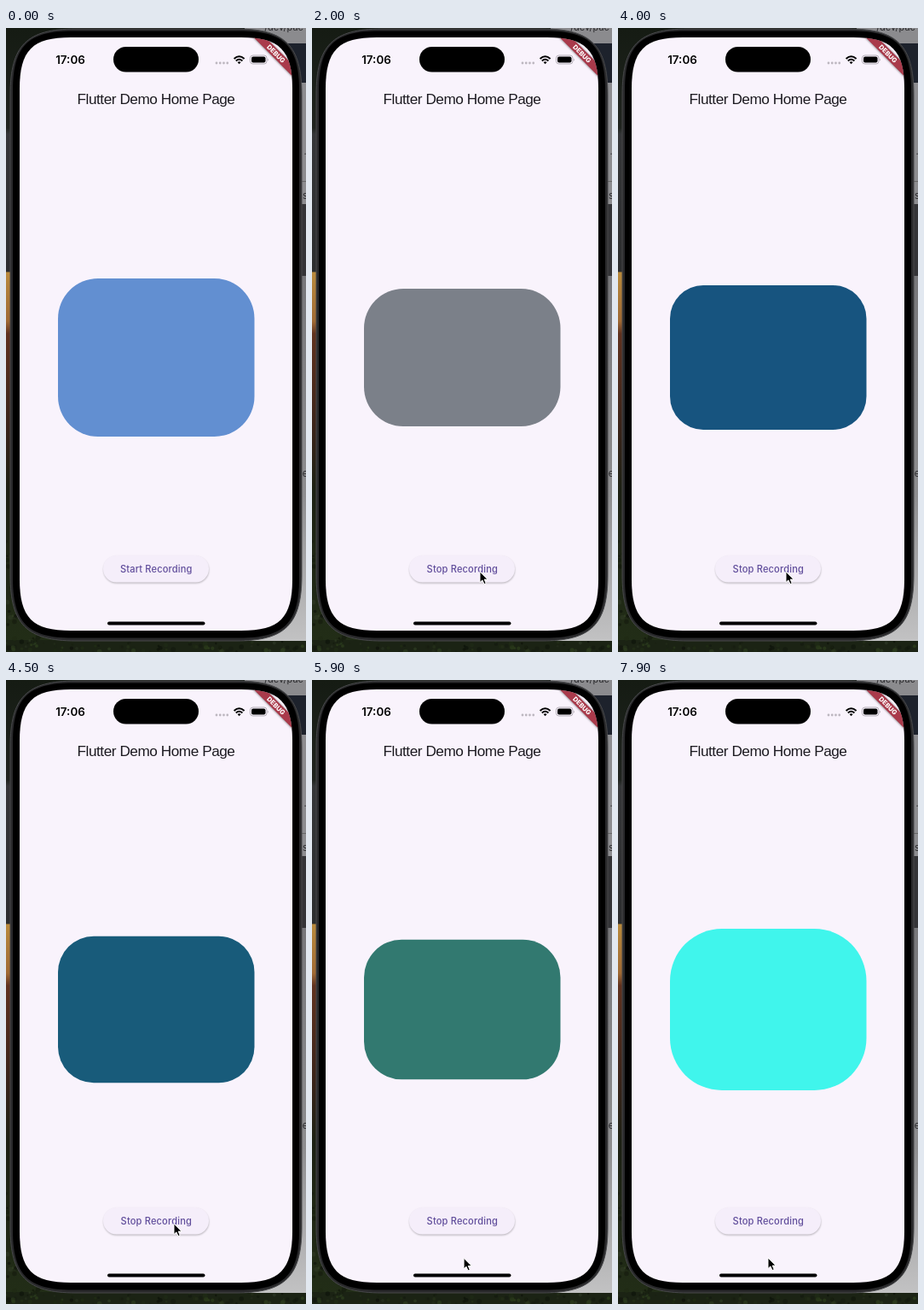
An HTML page that plays this animation: 352x730 px, repeating every 8 s.

```html
<!DOCTYPE html>
<html lang="en">
<head>
<meta charset="utf-8">
<title>Shape morph demo</title>
<style>
  html, body { margin: 0; width: 100%; height: 100%; overflow: hidden; background: #171a14; }
  svg { display: block; width: 352px; height: 730px; }
  text { text-anchor: middle; }
  .ui { font-family: Inter, "Open Sans", sans-serif; }
  .title { font: 17.2px "Liberation Sans", Arial, sans-serif; letter-spacing: -.45px; fill: #1c1a20; }
  .label { font-size: 11.1px; font-weight: 500; letter-spacing: .15px; fill: #604d9b; }
  .clock { font-size: 13.4px; font-weight: 600; }
  .scrap { font-size: 11px; fill: #29292c; }
</style>
</head>
<body>
<svg viewBox="0 0 352 730">
  <defs>
    <linearGradient id="photo" x2="0" y2="1">
      <stop offset="0" stop-color="#151b13"/>
      <stop offset=".16" stop-color="#20241f"/>
      <stop offset=".17" stop-color="#353638"/>
      <stop offset=".39" stop-color="#2c2d2e"/>
      <stop offset=".392" stop-color="#b98a3c"/>
      <stop offset=".47" stop-color="#a06a34"/>
      <stop offset=".49" stop-color="#60321f"/>
      <stop offset=".64" stop-color="#3a241a"/>
      <stop offset=".74" stop-color="#1c2013"/>
      <stop offset="1" stop-color="#222e17"/>
    </linearGradient>
    <linearGradient id="pane" x2="0" y2="1">
      <stop offset="0" stop-color="#77777a"/>
      <stop offset=".6" stop-color="#8e8e90"/>
      <stop offset="1" stop-color="#c2c2c3"/>
    </linearGradient>
    <clipPath id="clip"><path id="mask"/></clipPath>
    <filter id="soft" x="-10%" y="-60%" width="120%" height="220%"><feGaussianBlur stdDeviation="1.1"/></filter>
  </defs>

  <!-- desktop behind the phone -->
  <rect width="352" height="730" fill="url(#photo)"/>
  <rect y="716" width="352" height="14" fill="#1b2314"/>
  <g id="leaves"></g>
  <rect x="280" width="72" height="18" fill="#8b8b8e"/>
  <rect x="300" y="18" width="52" height="46" fill="#1d222c"/>
  <rect x="300" y="64" width="52" height="142" fill="#8d8d90"/>
  <rect x="300" y="179" width="52" height="1" fill="#666"/>
  <rect x="300" y="206" width="52" height="84" fill="#343437"/>
  <rect x="280" y="290" width="72" height="427" fill="url(#pane)"/>
  <g class="ui scrap">
    <text x="326" y="2.5">/dev/pac</text>
    <text x="351" y="148">.</text>
    <text x="351" y="200">s</text>
    <text x="351" y="525">e</text>
  </g>

  <!-- phone -->
  <path id="rim" fill="#29292b" stroke="#48494b"/>
  <path id="bezel"/>
  <path id="screen" fill="#f9f3fc"/>

  <text class="ui clock" x="75.5" y="41.8">17:06</text>
  <rect x="126" y="22" width="100" height="29.5" rx="14.75"/>
  <path d="M247 41H260" stroke="#bdb7c0" stroke-width="2.8" stroke-linecap="round" stroke-dasharray="0 4.25"/>
  <g fill="none" stroke="#000" stroke-width="2">
    <path d="M267.6 36Q273.6 30.4 279.6 36"/>
    <path d="M269.8 38.4Q273.6 35 277.4 38.4"/>
  </g>
  <path d="M271.6 40.1Q273.6 38.5 275.6 40.1L273.6 42.2Z"/>
  <rect x="286.5" y="32" width="19.5" height="10" rx="3.2" fill="none" stroke="#aaa4ad" stroke-width=".9"/>
  <rect x="288" y="33.5" width="16.5" height="7" rx="2"/>
  <path d="M307.2 35.4Q309 37 307.2 38.7Z" fill="#aaa4ad"/>

  <g clip-path="url(#clip)">
    <g transform="translate(336 11) rotate(45)">
      <rect x="-50" y="22.3" width="100" height="10.2" opacity=".5" filter="url(#soft)"/>
      <rect x="-50" y="22.3" width="100" height="9.8" fill="#a93a4b"/>
      <text class="ui" y="29.8" font-size="7.6" font-weight="800" fill="#fff">DEBUG</text>
    </g>
  </g>

  <text class="title" x="176" y="89">Flutter Demo Home Page</text>
  <rect id="shape" x="61" width="230.5"/>

  <rect x="114.5" y="618.6" width="123.5" height="31" rx="15.5" opacity=".28" filter="url(#soft)"/>
  <rect x="114" y="617" width="124" height="31.5" rx="15.75" fill="#f5eefa"/>
  <text id="label" class="ui label" x="176.3" y="636.8"></text>
  <rect x="119" y="694.5" width="114.5" height="4" rx="2"/>

  <path id="cursor" d="M0 0V12.6L2.9 9.9L5 14.6L7.2 13.6L5.2 9.1H9.2Z" stroke="#fff" stroke-linejoin="round"/>
</svg>
<script>
const LOOP = 8000, STEP = 100, MID = 385.5;
const ENTER = 1400, CLICK = 1900;

const poses = [
  { t: 0, h: 185, r: 47, fill: "#628fd1" },
  { t: 900, h: 57, r: 40, fill: "#872a45" },
  { t: 2700, h: 227, r: 50, fill: "#74b7b5" },
  { t: 4000, h: 169, r: 39, fill: "#17547f" },
  { t: 5200, h: 175, r: 46, fill: "#1a6473" },
  { t: 5600, h: 216, r: 46, fill: "#2a7071" },
  { t: 6600, h: 41, r: 40, fill: "#458f6d" },
  { t: 7900, h: 189, r: 61, fill: "#40f5ec" }
];
const stops = [
  { t: ENTER, x: 236, y: 722 },
  { t: 1800, x: 197, y: 636 },
  { t: 5200, x: 197, y: 636 },
  { t: 5500, x: 181, y: 700 },
  { t: 6600, x: 173, y: 635 },
  { t: 7000, x: 178, y: 702 },
  { t: 7300, x: 176, y: 676 }
];

const get = id => document.getElementById(id);
const mix = (a, b, p) => a + (b - a) * p;
const channels = hex => [1, 3, 5].map(i => parseInt(hex.slice(i, i + 2), 16));

function set(node, attrs) {
  for (const name in attrs) node.setAttribute(name, attrs[name]);
}

// The two keys around t and the progress between them
function between(keys, t) {
  const i = keys.findIndex(key => key.t > t);
  const b = keys[i < 0 ? keys.length - 1 : i];
  const a = i > 0 ? keys[i - 1] : b;
  return [a, b, a === b ? 0 : (t - a.t) / (b.t - a.t)];
}

// Box with continuous corners that start at distance d
function squircle(x, y, w, h, d) {
  const k = d / 4, s = d - k;
  return `M${x + d} ${y}h${w - 2 * d}c${s} 0 ${d} ${k} ${d} ${d}v${h - 2 * d}` +
    `c0 ${s} ${-k} ${d} ${-d} ${d}h${2 * d - w}c${-s} 0 ${-d} ${-k} ${-d} ${-d}` +
    `v${2 * d - h}c0 ${-s} ${k} ${-d} ${d} ${-d}z`;
}

function buildPhone() {
  set(get("rim"), { d: squircle(5, 1, 342, 716, 77) });
  set(get("bezel"), { d: squircle(8, 3.5, 336, 710, 70) });
  for (const id of ["screen", "mask"]) set(get(id), { d: squircle(16, 11, 320, 694, 60) });
}

function scatterLeaves() {
  let seed = 7;
  const random = () => (seed = seed * 16807 % 2147483647) / 2147483647;
  for (let i = 0; i < 160; i++) {
    const leaf = document.createElementNS("http://www.w3.org/2000/svg", "circle");
    const low = i % 2;
    set(leaf, {
      cx: random() * (low ? 352 : 40), cy: low ? mix(718, 730, random()) : mix(600, 730, random()),
      r: mix(1, 3, random()), fill: `hsl(90 ${mix(20, 40, random())}% ${mix(4, 20, random())}%)`, opacity: .6
    });
    get("leaves").append(leaf);
  }
}

function draw(t) {
  const [a, b, p] = between(poses, t);
  const h = mix(a.h, b.h, p), r = Math.min(mix(a.r, b.r, p), h / 2);
  const to = channels(b.fill);
  const rgb = channels(a.fill).map((v, i) => Math.round(mix(v, to[i], p)));
  set(get("shape"), { y: MID - h / 2, height: h, rx: r, fill: `rgb(${rgb})` });

  const [from, next, q] = between(stops, t);
  set(get("cursor"), {
    transform: `translate(${mix(from.x, next.x, q)} ${mix(from.y, next.y, q)})`,
    visibility: t < ENTER ? "hidden" : "visible"
  });
  get("label").textContent = t < CLICK ? "Start Recording" : "Stop Recording";
}

buildPhone();
scatterLeaves();
const start = performance.now();
function tick() {
  const t = (performance.now() - start) % LOOP;
  draw(Math.floor(t / STEP) * STEP);
  requestAnimationFrame(tick);
}
tick();
</script>
</body>
</html>
```
